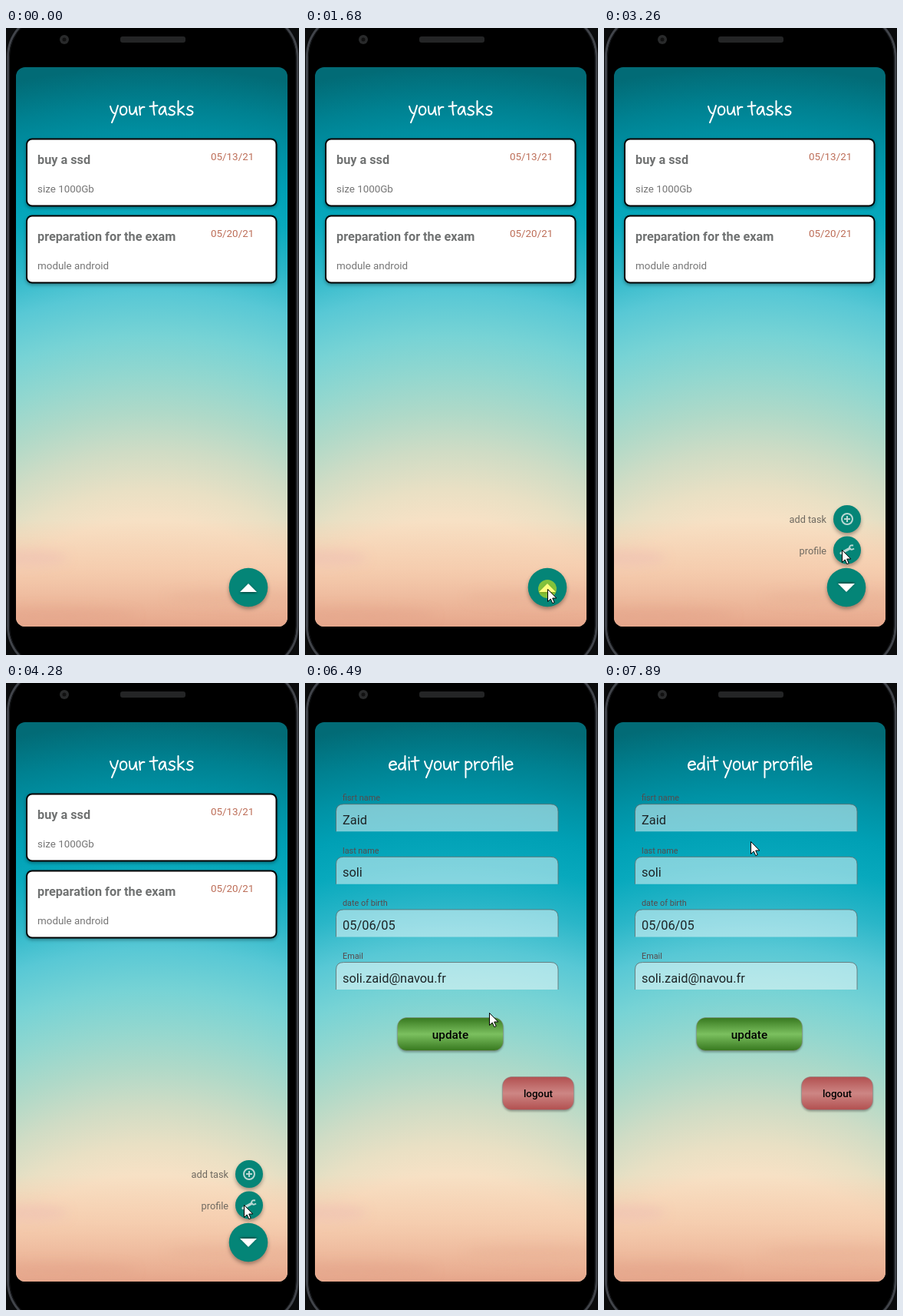
Animation of 382x816 px, one loop 8 s. Source, as an HTML page:

```html
<!DOCTYPE html>
<html lang="en">
<head>
<meta charset="utf-8">
<title>Task app</title>
<style>
html, body { margin: 0; width: 100%; height: 100%; overflow: hidden; background: #000; }
svg { display: block; width: 100%; height: 100%; font-family: Roboto, sans-serif; }
.hand { fill: none; stroke: #fff; stroke-width: 2; stroke-linecap: round; stroke-linejoin: round; }
.card rect { fill: #fff; stroke: #000; stroke-width: 2; filter: drop-shadow(0 2px 2px #0005); }
.card text { font-size: 13.4px; fill: #757575; }
.card .head { font-size: 16.25px; font-weight: 700; fill: #707272; }
.card .date { fill: #bd6e58; }
.fab { fill: #048577; filter: drop-shadow(0 3px 2.5px #0005); }
.item text { font-size: 12.7px; fill: #6e6960; text-anchor: end; }
.label { font-size: 10.85px; fill: #574a4c; }
.value { font-size: 16.4px; fill: #1d2426; }
.button rect { stroke: #8888; filter: drop-shadow(0 2px 1px #0004); }
.button text { font-weight: 500; text-anchor: middle; }
</style>
</head>
<body>
<svg viewBox="0 0 382 816">
  <defs>
    <radialGradient id="sky" gradientUnits="userSpaceOnUse" cx="190" cy="900" r="850"></radialGradient>
    <linearGradient id="dusk" x1="0" y1="0" x2="0" y2="1">
      <stop offset="0" stop-color="#f6c9a8" stop-opacity="0"/>
      <stop offset=".45" stop-color="#f5c9aa" stop-opacity=".8"/>
      <stop offset="1" stop-color="#e6a68b"/>
    </linearGradient>
    <linearGradient id="green" x1="0" y1="0" x2="0" y2="1">
      <stop stop-color="#37781f"/><stop offset=".5" stop-color="#7bc05f"/><stop offset="1" stop-color="#37781f"/>
    </linearGradient>
    <linearGradient id="red" x1="0" y1="0" x2="0" y2="1">
      <stop stop-color="#b25050"/><stop offset=".5" stop-color="#cd8684"/><stop offset="1" stop-color="#b25050"/>
    </linearGradient>
    <filter id="soft" x="-50%" y="-100%" width="200%" height="300%"><feGaussianBlur stdDeviation="7"/></filter>
    <clipPath id="screen"><rect x="13" y="51" width="354" height="728" rx="12"/></clipPath>
    <clipPath id="mini"><circle cx="317" cy="679.5" r="18"/></clipPath>
  </defs>

  <rect width="382" height="816" fill="#0a0b0c"/>
  <rect x="2.5" y="-20" width="377.5" height="856" rx="58" fill="#000" stroke="#41444a" stroke-width="3"/>
  <rect x="4.5" y="-18" width="373.5" height="852" rx="56" fill="none" stroke="#15171a"/>
  <circle cx="76" cy="15" r="6" fill="#292a2b"/>
  <circle cx="76" cy="15" r="2.5" fill="#111"/>
  <rect x="149" y="11" width="85" height="8" rx="3" fill="#242526"/>

  <g clip-path="url(#screen)">
    <rect x="13" y="51" width="354" height="728" fill="url(#sky)"/>
    <rect x="13" y="640" width="354" height="139" fill="url(#dusk)"/>
    <g filter="url(#soft)">
      <ellipse cx="30" cy="690" rx="50" ry="11" fill="#efc3b4" opacity=".7"/>
      <ellipse cx="60" cy="765" rx="110" ry="10" fill="#e4a68d" opacity=".6"/>
      <ellipse cx="300" cy="742" rx="90" ry="8" fill="#eab294" opacity=".5"/>
    </g>
  </g>

  <g id="tasks">
    <g id="menu"></g>
    <circle class="fab" cx="316" cy="728" r="25.3"/>
    <path id="arrow" d="M316 723L327 734H305Z" fill="#fff" style="filter: drop-shadow(0 1px 1.5px #0009)"/>
  </g>
  <g id="profile"></g>
  <circle id="press" r="12" fill="#ff0" opacity=".5"/>
  <path id="cursor" d="M.5.5V16.5L4.2 13 6.8 18.7 9.2 17.6 6.7 12H11.8Z" fill="#fff" stroke="#000"/>
</svg>
<script>
const $ = id => document.getElementById(id);
const add = (id, markup) => $(id).insertAdjacentHTML('beforeend', markup);
const text = (x, y, s, cls = '') => `<text x="${x}" y="${y}" class="${cls}">${s}</text>`;

// Sky colours by height on the centre line
const sky = [[779, '#f8dcc0'], [640, '#f7e1c5'], [600, '#e9e0c4'], [550, '#cfdcc5'], [500, '#afd9c8'],
  [450, '#92d7cf'], [400, '#77d3d5'], [345, '#58c8d5'], [290, '#2ab6c8'], [235, '#08a9bd'],
  [190, '#00a0b5'], [145, '#0092a5'], [100, '#008191'], [51, '#026b76']];
for (const [y, color] of sky)
  add('sky', `<stop offset="${(900 - y) / 850}" stop-color="${color}"/>`);

// Handwritten letters: advance and strokes, baseline at 0
const glyphs = {
  y: [12.5, 'M1-11Q3-3 6-2M11-12Q8 0 3 10'],
  o: [12.5, 'M6-11C0-11 0 0 5 0C11 0 12-11 5.5-11'],
  u: [12.5, 'M1-11C1-2 2 0 5-1Q8-2 9.5-10Q9.5-3 11 0'],
  r: [9.5, 'M1.5-11L2.5 0M2-6Q4-11 8-10'],
  t: [11, 'M5-17Q4.5-5 6 0M0-11L10-12'],
  a: [12.5, 'M9-10C4-13 0-6 1.5-2C3 2 8-3 9-10Q9-3 11 0'],
  s: [11.5, 'M9-10C6-13 1-10 2.5-7.5C4-5 9-6 9-3C8.5 1 3 1 1-1'],
  k: [12, 'M2-18V0M9-11L2-5.5Q6-4 10 0'],
  e: [12, 'M1.5-6L10-7C9-13 2-12 1-6C1 1 7 1 10-2'],
  d: [12.5, 'M9-8C4-11 0-6 1.5-2C4 2 9-2 9-8M9.5-18Q9-5 10 0'],
  i: [5, 'M2-11L2.5 0M2-16v.5'],
  p: [12, 'M2-11V10M2-8C6-14 12-8 9-3C7 0 4 0 2-2'],
  f: [9, 'M8-17C4-18 4-12 4 0M0-9L8-10'],
  l: [5, 'M2-18L2.5 0'],
  ' ': [5.5, '']
};
function title(x, s) {
  let strokes = '', at = x;
  for (const c of s) {
    strokes += `<path transform="translate(${at} 113)" d="${glyphs[c][1]}"/>`;
    at += glyphs[c][0];
  }
  return `<g class="hand">${strokes}</g><text x="${x}" y="113" font-size="24" fill="none">${s}</text>`;
}

const card = (y, head, note, date) => `<g class="card" transform="translate(0 ${y})">
  <rect x="27" y="1" width="325.5" height="87" rx="7"/>
  ${text(41, 33.5, head, 'head')}${text(41, 70.5, note)}${text(267, 28.5, date, 'date')}</g>`;
add('tasks', title(135, 'your tasks') +
  card(143.5, 'buy a ssd', 'size 1000Gb', '05/13/21') +
  card(243.5, 'preparation for the exam', 'module android', '05/20/21'));

const item = (id, y, name, icon) => `<g class="item" id="${id}">${text(290, y + 5, name)}
  <g class="pop"><circle class="fab" cx="317" cy="${y}" r="18"/>
  <g transform="translate(317 ${y})" fill="none" stroke="#b9d8d3" stroke-width="2">${icon}</g></g></g>`;
add('menu',
  item('add', 639, 'add task', '<circle r="7"/><path d="M-4 0H4M0-4V4"/>') +
  item('edit', 679.5, 'profile', '<path d="M-8 4L3-2" stroke-width="3.4" stroke-linecap="round"/><path d="M8-6Q3-7 3-3Q5 1 9-2"/>') +
  '<circle id="ripple" cx="310" cy="679" fill="#fff" clip-path="url(#mini)"/>');

const field = (y, label, value) => text(49, y - 4.2, label, 'label') +
  `<path d="M40.5 ${y + 36}V${y + 10}q0-9.5 10-9.5H320q10 0 10 9.5V${y + 36}" fill="#fff" fill-opacity=".48" stroke="#5f6a6a" stroke-opacity=".8"/>` +
  text(49, y + 26.5, value, 'value');
const button = (x, y, w, name, size, fill) => `<g class="button">
  <rect x="${x}" y="${y}" width="${w}" height="43" rx="12" fill="url(#${fill})"/>
  <text x="${x + w / 2}" y="${y + 21.5 + size * .36}" font-size="${size}">${name}</text></g>`;
add('profile', title(109, 'edit your profile') +
  field(157.2, 'fisrt name', 'Zaid') +
  field(225.8, 'last name', 'soli') +
  field(294.4, 'date of birth', '05/06/05') +
  field(363, 'Email', 'soli.zaid@navou.fr') +
  button(120.5, 435.5, 138, 'update', 15.3, 'green') +
  button(257.5, 512.5, 93, 'logout', 13.4, 'red'));

// Progress in n held steps, the first of them at t0
const steps = (t, t0, t1, n) => t < t0 ? 0 : t >= t1 ? 1 :
  (Math.floor((t - t0) / (t1 - t0) * (n - 1) + 1e-6) + 1) / n;
const clamp = v => Math.max(0, Math.min(1, v));
const ease = p => p * p * (3 - 2 * p);

// Pointer moves: start, end, steps, x, y
const moves = [
  [180, 950, 12, 316, 732], [1020, 1020, 1, 316, 730], [2640, 3260, 10, 310, 679],
  [6490, 6490, 1, 240, 429], [6560, 6560, 1, 224, 330], [6620, 6620, 1, 232, 265],
  [6690, 6690, 1, 248, 227], [6840, 7200, 6, 232, 184], [7270, 7610, 6, 195, 190],
  [7680, 7890, 4, 191, 206]
];

function pointer(t) {
  let x = 357, y = 823;
  for (const [t0, t1, n, tx, ty] of moves) {
    const p = steps(t, t0, t1, n);
    x += (tx - x) * p;
    y += (ty - y) * p;
  }
  return `translate(${x} ${y})`;
}

function pop(id, y, p) {
  const s = ease(clamp(p));
  $(id).setAttribute('opacity', s);
  $(id).querySelector('.pop').setAttribute('transform',
    `translate(317 ${y}) scale(${s}) translate(-317 ${-y})`);
}

function draw(t) {
  const at = pointer(t), open = steps(t, 1880, 2300, 7);
  $('cursor').setAttribute('transform', at);
  $('press').setAttribute('transform', at);
  const down = t >= 1680 && t < 1880 || t >= 3530 && t < 3730;
  $('press').style.display = down ? '' : 'none';

  $('tasks').style.display = t < 4820 ? '' : 'none';
  $('profile').style.display = t < 4820 ? 'none' : '';
  $('arrow').setAttribute('transform', `rotate(${180 * ease(open)} 316 728.5)`);
  pop('edit', 679.5, open * 1.4);
  pop('add', 639, open * 1.4 - .3);

  const wave = steps(t, 3530, 4080, 8);
  $('ripple').setAttribute('r', 30 * wave);
  $('ripple').setAttribute('opacity', t < 4280 ? .2 * Math.min(1, 2 - 1.6 * wave) : 0);
}

function frame() {
  draw(performance.now() % 8000);
  requestAnimationFrame(frame);
}
frame();
</script>
</body>
</html>
```
